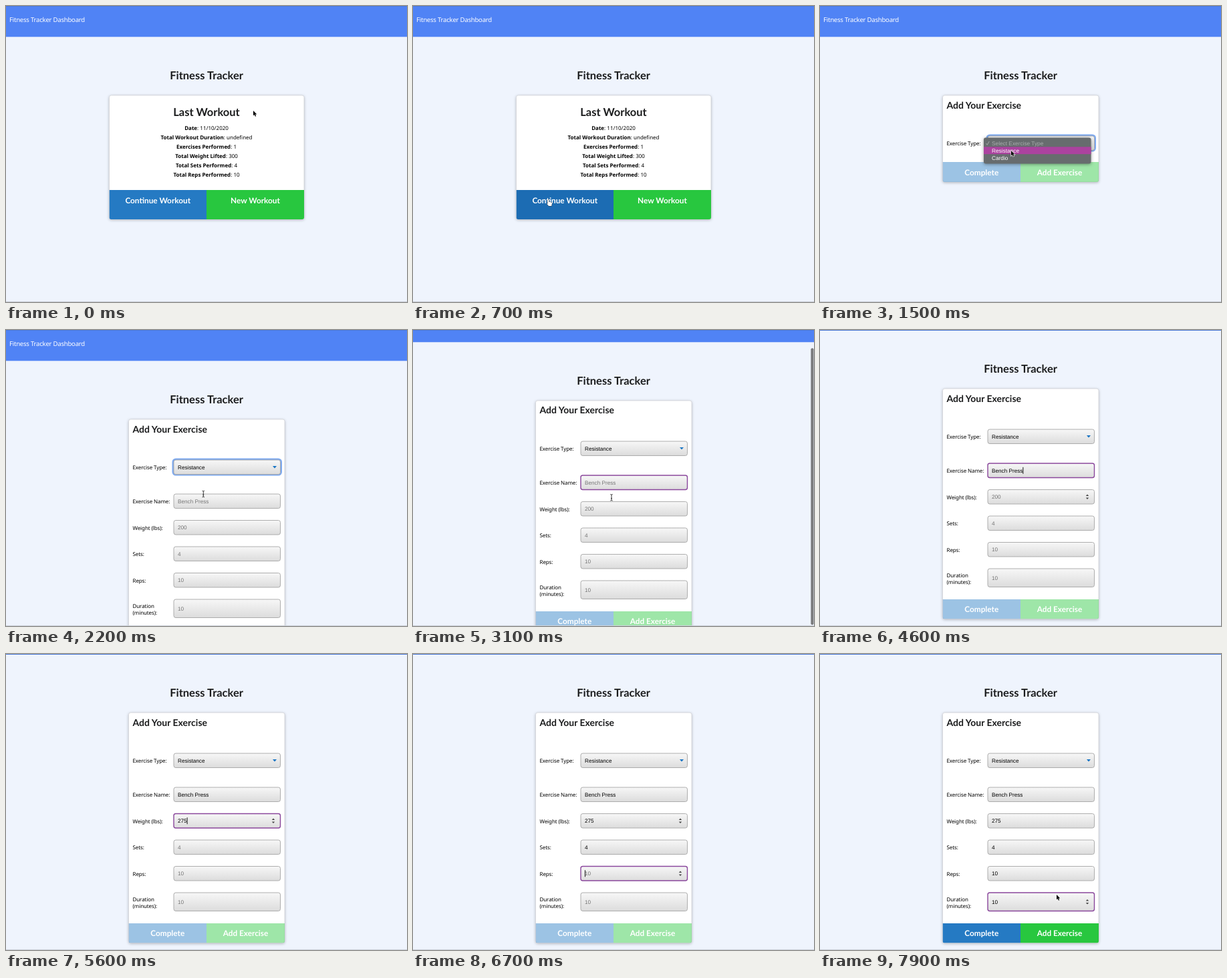
An HTML page with a canvas for the animation above (8 s loop, 600 by 444 pixels).

```html
<!DOCTYPE html>
<html lang="en">
<head>
<meta charset="utf-8">
<title>Fitness Tracker</title>
<style>
  html, body { margin: 0; width: 100%; height: 100%; overflow: hidden; background: #eff4fd; }
  canvas { display: block; }
</style>
</head>
<body>
<canvas id="stage" width="600" height="444"></canvas>
<script>
const ctx = document.getElementById("stage").getContext("2d");
const LOOP = 8000, STEP = 100;
const BLUE = "#257ac3", BLUE_HOVER = "#1c6cb3", GREEN = "#28c73f", PURPLE = "#8a479c";
const HEADING = "Lato, sans-serif";
const BODY = '"Noto Sans", sans-serif';
const CONTROL = '"Liberation Sans", Arial, sans-serif';

const stats = [
  ["Date", "11/10/2020"],
  ["Total Workout Duration", "undefined"],
  ["Exercises Performed", "1"],
  ["Total Weight Lifted", "300"],
  ["Total Sets Performed", "4"],
  ["Total Reps Performed", "10"],
];

const fields = [
  { label: ["Exercise Name:"], hint: "Bench Press", y: 246, h: 21.5 },
  { label: ["Weight (lbs):"], hint: "200", y: 285.5, h: 21.5, number: true },
  { label: ["Sets:"], hint: "4", y: 325, h: 21.5, number: true },
  { label: ["Reps:"], hint: "10", y: 364.5, h: 21.5, number: true },
  { label: ["Duration", "(minutes):"], hint: "10", y: 404, h: 27.5, number: true },
];

// Keyboard input: time, focused field, its text, start of the caret blink
const typing = [
  [2300, 0, ""],
  ...[..."Bench Press"].map((_, i, all) => [3800 + 70 * (i + 1), 0, all.slice(0, i + 1).join("")]),
  [4700, 1, ""], [5400, 1, "27"], [5600, 1, "275"],
  [5900, 2, ""], [6200, 2, "4"],
  [6500, 3, ""], [6900, 3, "10"],
  [6900, 4, "", 6800], [7500, 4, "10", 7400],
];

// Pointer path: time, x, y
const path = [
  [0, 370, 157], [100, 367, 163], [600, 202, 288], [700, 200, 290], [1000, 201, 290],
  [1300, 286, 207], [1400, 286, 208], [1500, 286, 217], [1900, 286, 217],
  [2300, 297, 251], [7500, 297, 251], [7900, 354, 361],
];

const clamp = v => Math.max(0, Math.min(1, v));

function pointerAt(t) {
  const next = path.findIndex(p => p[0] > t);
  if (next < 0) return path.at(-1).slice(1);
  const [t0, x0, y0] = path[next - 1], [t1, x1, y1] = path[next];
  const k = (t - t0) / (t1 - t0), e = k * k * (3 - 2 * k);
  return [x0 + (x1 - x0) * e, y0 + (y1 - y0) * e];
}

function rect(x, y, w, h, color) {
  ctx.fillStyle = color;
  ctx.fillRect(x, y, w, h);
}

function rounded(x, y, w, h, r) {
  ctx.beginPath();
  ctx.roundRect(x, y, w, h, r);
}

function text(s, x, y, font, color = "#000", align = "left", spacing = 0) {
  ctx.font = font;
  ctx.fillStyle = color;
  ctx.textAlign = align;
  ctx.letterSpacing = spacing + "px";
  ctx.fillText(s, x, y);
}

const heading = (s, x, y, size, color = "#1b1c1d", align = "center") =>
  text(s, x, y, `bold ${size}px ${HEADING}`, color, align);
const label = (s, x, y) => text(s, x, y, `8px ${BODY}`, "#000", "left", -0.1);

function triangle(x, y, w, h, color) {
  ctx.fillStyle = color;
  ctx.beginPath();
  ctx.moveTo(x - w / 2, y);
  ctx.lineTo(x + w / 2, y);
  ctx.lineTo(x, y + h);
  ctx.fill();
}

function card(x, y, w, h) {
  ctx.save();
  ctx.shadowColor = "rgba(0,0,0,.28)";
  ctx.shadowBlur = 4;
  ctx.shadowOffsetY = 1;
  rounded(x, y, w, h, 3);
  ctx.fillStyle = "#fff";
  ctx.fill();
  ctx.restore();
  ctx.strokeStyle = "#d0d2d6";
  ctx.lineWidth = 0.7;
  ctx.stroke();
}

function buttons(x, y, w, h, names, textY, alpha = 1, left = BLUE) {
  ctx.save();
  rounded(x, y, w, h, [0, 0, 3, 3]);
  ctx.clip();
  ctx.globalAlpha = alpha;
  rect(x, y, 300 - x, h, left);
  rect(300, y, x + w - 300, h, GREEN);
  ctx.restore();
  heading(names[0], (x + 300) / 2, textY, 11.8, "#fff");
  heading(names[1], (x + w + 300) / 2, textY, 11.8, "#fff");
}

function box(y, h, focused) {
  const shade = ctx.createLinearGradient(0, y, 0, y + h);
  shade.addColorStop(0, "#f7f7f7");
  shade.addColorStop(1, "#dcdcdc");
  rounded(251, y, 159.5, h, 3);
  ctx.fillStyle = shade;
  ctx.fill();
  ctx.strokeStyle = focused ? PURPLE : "#a5a5a5";
  ctx.lineWidth = focused ? 1.4 : 0.9;
  ctx.stroke();
}

function drawSummary(t) {
  card(154.5, 134, 291.5, 186);
  heading("Last Workout", 300, 165, 16.5);
  stats.forEach(([name, value], i) => {
    const bold = `bold 8px ${BODY}`, plain = `8px ${BODY}`, rest = ": " + value;
    ctx.letterSpacing = "0px";
    ctx.font = bold;
    const nameWidth = ctx.measureText(name).width;
    ctx.font = plain;
    const x = 300 - (nameWidth + ctx.measureText(rest).width) / 2;
    const y = 186 + 14 * i;
    text(name, x, y, bold);
    text(rest, x + nameWidth, y, plain);
  });
  buttons(154.5, 276, 291.5, 44, ["Continue Workout", "New Workout"], 295.5, 1,
    t >= 600 ? BLUE_HOVER : BLUE);
}

function drawField(field, i, t, values, focus) {
  const { y, h, hint, number } = field, middle = y + h / 2, base = middle + 3;
  const focused = focus?.[1] === i, value = values[i];
  field.label.forEach((line, n) =>
    label(line, 189.5, base + 0.7 + (n - (field.label.length - 1) / 2) * 10.5 + (i === 4 ? 0.7 : 0)));
  box(y, h, focused);
  text(value || hint, 257, base, `8.2px ${CONTROL}`, value ? "#000" : "#757575");

  const hovered = i === 1 ? t >= 3600 && t < 7600 : i === 4 && t >= 7800;
  if (number && (focused || hovered)) {
    triangle(400, middle - 1.2, 4.4, -2.5, "#444");
    triangle(400, middle + 1.2, 4.4, 2.5, "#444");
  }
  if (focused && (t - (focus[3] ?? focus[0])) % 1000 < 500) {
    rect(257 + ctx.measureText(value).width, middle - 5, 0.9, 10, "#000");
  }
}

function drawForm(t) {
  const expanded = t >= 1900;
  const top = expanded ? 450 : 234, height = expanded ? 29.5 : 30;
  card(183.5, 134, 233.5, top + height - 134);
  heading("Add Your Exercise", 189.5, 153.5, 14, "#1b1c1d", "left");
  label("Exercise Type:", 189.5, 208.8);
  if (t >= 1300 && t < 2300) {
    rounded(250, 194, 161.5, 23, 4);
    ctx.strokeStyle = "#7eaaf0";
    ctx.lineWidth = 3;
    ctx.stroke();
  }
  box(195, 21.5, false);
  text(expanded ? "Resistance" : "Select Exercise Type", 257, 208.6, `8.2px ${CONTROL}`);
  triangle(402, 204, 6, 3.4, "#1674c4");

  if (expanded) {
    const events = typing.filter(e => e[0] <= t), values = ["", "", "", "", ""];
    events.forEach(e => values[e[1]] = e[2]);
    fields.forEach((f, i) => drawField(f, i, t, values, events.at(-1)));
  }
  buttons(183.5, top, 233.5, height, ["Complete", "Add Exercise"], top + (expanded ? 19 : 19.8),
    0.45 + 0.55 * clamp((t - 7400) / 200));
  if (t >= 1300 && !expanded) drawMenu(t);
}

function drawMenu(t) {
  ctx.save();
  ctx.shadowColor = "rgba(0,0,0,.4)";
  ctx.shadowBlur = 5;
  ctx.shadowOffsetY = 1;
  rounded(245, 197.5, 160.5, 39, 3);
  ctx.fillStyle = "#676c6e";
  ctx.fill();
  ctx.restore();
  if (t >= 1500) rect(245, 211.3, 160.5, 10.9, "#ab429f");
  const font = `8.3px ${CONTROL}`;
  text("Select Exercise Type", 257, 208.5, font, "#a9adae");
  text("Resistance", 257, 219.5, font, "#fff");
  text("Cardio", 257, 230.5, font, "#fff");
  ctx.strokeStyle = "#a9adae";
  ctx.lineWidth = 0.9;
  ctx.stroke(new Path2D("M248.5 206l1.7 2.4 3-5.4"));
}

const arrow = new Path2D("M0 0V7.6L1.7 6 2.9 8.8 4.2 8.2 3 5.6H5.3Z");
const hand = new Path2D("M2 1Q2.9 0 3.6 1V4Q4.6 3.4 5.2 4.2 6.2 3.8 6.7 4.7 8 4.4 8 5.7L7.3 10H3L.3 6.7Q.2 5.4 2 6.4Z");
const beam = new Path2D("M-1.7-4.5Q0-4.5 0-3.3 0-4.5 1.7-4.5M0-3.3V3.8M-1.7 5Q0 5 0 3.8 0 5 1.7 5M-1 1.5H1");

function drawPointer(t) {
  if (t >= 3900 && t < 7500) return;
  const [x, y] = pointerAt(t);
  ctx.save();
  ctx.translate(x, y);
  if (t >= 2200 && t < 3900) {
    ctx.strokeStyle = "#222";
    ctx.lineWidth = 0.9;
    ctx.stroke(beam);
  } else {
    const pointing = t < 1000 && y > 276;
    ctx.lineWidth = pointing ? 0.8 : 1.2;
    ctx.strokeStyle = pointing ? "#111" : "#fff";
    ctx.fillStyle = pointing ? "#fff" : "#000";
    ctx.stroke(arrow === hand || pointing ? hand : arrow);
    ctx.fill(pointing ? hand : arrow);
  }
  ctx.restore();
}

function draw(t) {
  const scroll = 46 * (1 - (1 - clamp((t - 2900) / 533)) ** 2);
  rect(0, 0, 600, 444, "#eff4fd");
  ctx.save();
  ctx.translate(0, -scroll);
  rect(0, 0, 600, 46.3, "#5083f5");
  text("Fitness Tracker Dashboard", 5, 24, `9.6px ${BODY}`, "#fff", "left", -0.25);
  heading("Fitness Tracker", 300, 109.8, 16.5);
  if (t < 1000) drawSummary(t);
  else drawForm(t);
  ctx.restore();

  if (t >= 3000 && t < 3800) {
    ctx.globalAlpha = clamp((3900 - t) / 300);
    rounded(595.3, 2 + scroll * 0.9, 4.2, 415, 2);
    ctx.fillStyle = "#7a7b7d";
    ctx.fill();
    ctx.globalAlpha = 1;
  }
  rect(0, 0, 600, 1, "#4c79d6");
  rect(0, 443, 600, 1, "#cbd0d8");
  drawPointer(t);
}

ctx.textRendering = "geometricPrecision";
const start = performance.now();
function tick() {
  const t = (performance.now() - start) % LOOP;
  draw(Math.floor(t / STEP) * STEP);
  requestAnimationFrame(tick);
}
tick();
</script>
</body>
</html>
```
